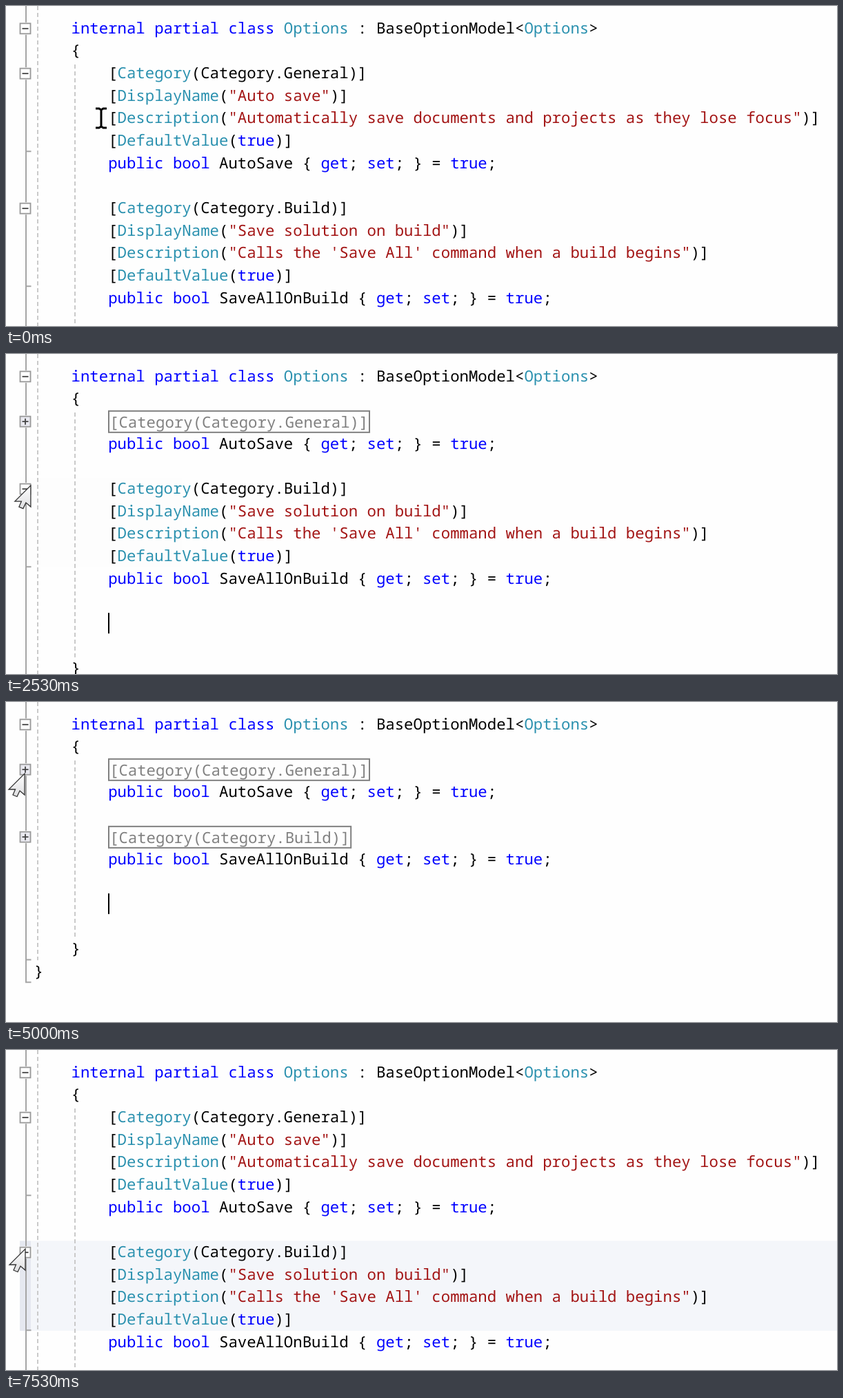
An HTML page for the animation above (9.73 s loop, 1205 by 465 pixels).

```html
<!DOCTYPE html>
<html lang="en">
<head>
<meta charset="utf-8">
<title>Collapsing attributes</title>
<style>
  html, body { margin: 0; width: 100%; height: 100%; overflow: hidden; background: #fefefe; }
  svg { display: block; width: 100vw; height: 100vh; }
  text {
    font: 22.35px "Noto Sans Mono", "DejaVu Sans Mono", monospace;
    white-space: pre;
    text-rendering: geometricPrecision;
  }
  .kw { fill: #0000ff; }
  .type { fill: #2b91af; }
  .str { fill: #a31515; }
  .folded { fill: #808080; }
  .frame { fill: none; stroke: #808080; stroke-width: 2; }
  .guide { stroke: #cacaca; stroke-width: 2; stroke-dasharray: 6 4; }
  .rail { fill: none; stroke: #a5a5a5; stroke-width: 2; }
  .gap { fill: #fefefe; }
  .knob { fill: #fefefe; stroke: #999; stroke-width: 1.8; }
  .knob.plus { fill: #e9e9f0; }
  .sign { stroke: #444; stroke-width: 1.8; }
</style>
</head>
<body>
<svg viewBox="0 0 1205 465" preserveAspectRatio="none">
  <defs>
    <linearGradient id="sheen" x1="0" y1="0" x2="0" y2="1">
      <stop offset="0" stop-color="#fff"/><stop offset="1" stop-color="#dedee0"/>
    </linearGradient>
    <path id="stem" d="M-8-14H-3L0-12 3-14H8M0-12V12M-8 14H-3L0 12 3 14H8" fill="none"/>
  </defs>
  <g id="glow">
    <rect id="band" x="36" width="1169" fill="#f4f6fa"/>
    <rect id="gutter" x="20" width="16" fill="#e5e8f0"/>
  </g>
  <g id="code"></g>
  <rect id="caret" x="148" width="2" height="30"/>
  <g id="beam">
    <use href="#stem" stroke="#fff" stroke-width="6"/>
    <use href="#stem" stroke="#000" stroke-width="3"/>
  </g>
  <path id="arrow" d="M0 0V31L-7 25-11 33.5-17 31-13.5 23H-23Z" fill="url(#sheen)" stroke="#333" stroke-width="1.3"/>
</svg>
<script>
const LOOP = 9730, STEP = 200 / 3, BLINK = 530, RAMP = 230;
const ROW = 32.67, COL = 13.41, LEFT = 94.5;
const $ = id => document.getElementById(id);
const clamp = v => Math.max(0, Math.min(1, v));
const easeOut = f => 1 - (1 - f) ** 2;
const rowTop = n => 16 + ROW * n;
const baseline = n => 39.5 + ROW * n;

const groups = [
  { category: "General", name: "Auto save", prop: "AutoSave",
    about: "Automatically save documents and projects as they lose focus" },
  { category: "Build", name: "Save solution on build", prop: "SaveAllOnBuild",
    about: "Calls the 'Save All' command when a build begins" }
];

// Each click sets which groups are folded
const clicks = [
  { at: 0, folded: [false, false] },
  { at: 1460, folded: [true, false] },
  { at: 3530, folded: [true, true] },
  { at: 5660, folded: [false, true] },
  { at: 7200, folded: [false, false] }
];

const home = { x: 138, y: 163 };
const moves = [
  { from: 0, to: 330, x: 20, y: 165 },
  { from: 470, to: 1260, x: 34, y: 93 },
  { from: 1870, to: 2530, x: 36, y: 191 },
  { from: 2530, to: 3130, x: 24, y: 201 },
  { from: 3870, to: 4130, x: 15, y: 276 },
  { from: 4270, to: 5000, x: 27, y: 104 },
  { from: 5330, to: 5460, x: 31, y: 97 },
  { from: 5930, to: 6730, x: 32, y: 279 },
  { from: 6730, to: 7530, x: 28, y: 289 }
];

// Hovering the outline shades a group, or the whole class
const glows = [
  { span: 0, from: 270, to: 1460 },
  { span: 1, from: 2530, to: 3530 },
  { span: "all", from: 3840, to: 4270 },
  { span: "all", from: 6050, to: 6330 },
  { span: 1, from: 7270, to: LOOP }
];

const escapeText = s => s.replace(/&/g, "&amp;").replace(/</g, "&lt;").replace(/>/g, "&gt;");
const tokens = /("[^"]*")|\b(internal|partial|class|public|bool|get|set|true)\b|(\bOptions\b|(?<=\[)\w+)|[^"\w]+|\w+/g;

function paint(source) {
  return source.replace(tokens, (all, str, kw, type) => {
    const cls = str ? "str" : kw ? "kw" : type ? "type" : "";
    return cls ? `<tspan class="${cls}">${escapeText(all)}</tspan>` : escapeText(all);
  });
}

const textLine = (row, level, source) =>
  `<text x="${LEFT + 4 * COL * level}" y="${baseline(row)}">${paint(source)}</text>`;

function knob(row, folded) {
  const y = 32.8 + ROW * row;
  return `<rect class="gap" x="18" y="${y - 9}" width="20" height="18"/>` +
    `<rect class="knob ${folded ? "plus" : ""}" x="20.5" y="${y - 7.5}" width="15" height="15"/>` +
    `<path class="sign" d="M23.5 ${y}h9${folded ? `M28 ${y - 4.5}v9` : ""}"/>`;
}

function foldedLine(row, head) {
  return `<rect class="frame" x="149" y="${rowTop(row) + 1.5}" width="${head.length * COL + 2.5}" height="31"/>` +
    `<text class="folded" x="150" y="${baseline(row) + 2}">${head}</text>`;
}

function layout(folded) {
  let row = 2, knobs = knob(0, false), ticks = "";
  let text = textLine(0, 0, "internal partial class Options : BaseOptionModel<Options>") + textLine(1, 0, "{");
  const spans = {};
  const addTick = end => { ticks += `M28 ${rowTop(end) - 0.8}h8.5`; };

  groups.forEach((g, i) => {
    const start = row, head = `[Category(Category.${g.category})]`;
    knobs += knob(row, folded[i]);
    if (folded[i]) {
      text += foldedLine(row++, head);
    } else {
      const lines = [head, `[DisplayName("${g.name}")]`, `[Description("${g.about}")]`, "[DefaultValue(true)]"];
      for (const s of lines) text += textLine(row++, 1, s);
      spans[i] = [rowTop(start), rowTop(row)];
      addTick(row);
    }
    text += textLine(row, 1, `public bool ${g.prop} { get; set; } = true;`);
    row += 2;
  });

  const close = row + 2;
  text += textLine(close, 0, "}") + textLine(close + 1, -1, "}");
  addTick(close + 1);
  addTick(close + 2);
  spans.all = [rowTop(0), rowTop(close + 1)];
  const markup =
    `<path class="guide" d="M46 0V${rowTop(close + 1)}M100 85V${rowTop(close)}"/>` +
    `<path class="rail" d="M29 0V${rowTop(close + 2)}${ticks}"/>` + knobs + text;
  return { markup, spans, caretY: rowTop(row) + 0.8 };
}

for (const c of clicks) c.view = layout(c.folded);
let shown = null;

const show = (id, on) => $(id).setAttribute("visibility", on ? "visible" : "hidden");

function pointerAt(t) {
  let { x, y } = home;
  for (const m of moves) {
    const f = easeOut(clamp((t - m.from) / (m.to - m.from)));
    x += (m.x - x) * f;
    y += (m.y - y) * f;
  }
  return { x, y };
}

function drawPointer(t) {
  const { x, y } = pointerAt(t), inMargin = x < 45;
  for (const id of ["beam", "arrow"]) $(id).setAttribute("transform", `translate(${x} ${y})`);
  show("beam", !inMargin);
  show("arrow", inMargin);
}

function drawGlow(t, spans) {
  const strength = g => clamp((t - g.from) / RAMP) * clamp(1 - (t - g.to) / RAMP);
  const glow = glows.find(g => spans[g.span] && strength(g) > 0);
  $("glow").setAttribute("opacity", glow ? strength(glow) : 0);
  if (!glow) return;
  const [from, to] = spans[glow.span];
  for (const id of ["band", "gutter"]) {
    $(id).setAttribute("y", from);
    $(id).setAttribute("height", to - from);
  }
}

function render(t) {
  const click = clicks.filter(c => c.at <= t).pop(), view = click.view;
  if (shown !== view) {
    $("code").innerHTML = view.markup;
    $("caret").setAttribute("y", view.caretY);
    shown = view;
  }
  show("caret", Math.floor((t - click.at) / BLINK) % 2 === 0);

  // Pointer and shading refresh fifteen times a second
  const q = Math.floor((t + 7) / STEP) * STEP;
  drawPointer(q);
  drawGlow(q, view.spans);
}

const begin = performance.now();
function loop() {
  render((performance.now() - begin) % LOOP);
  requestAnimationFrame(loop);
}
loop();
</script>
</body>
</html>
```
